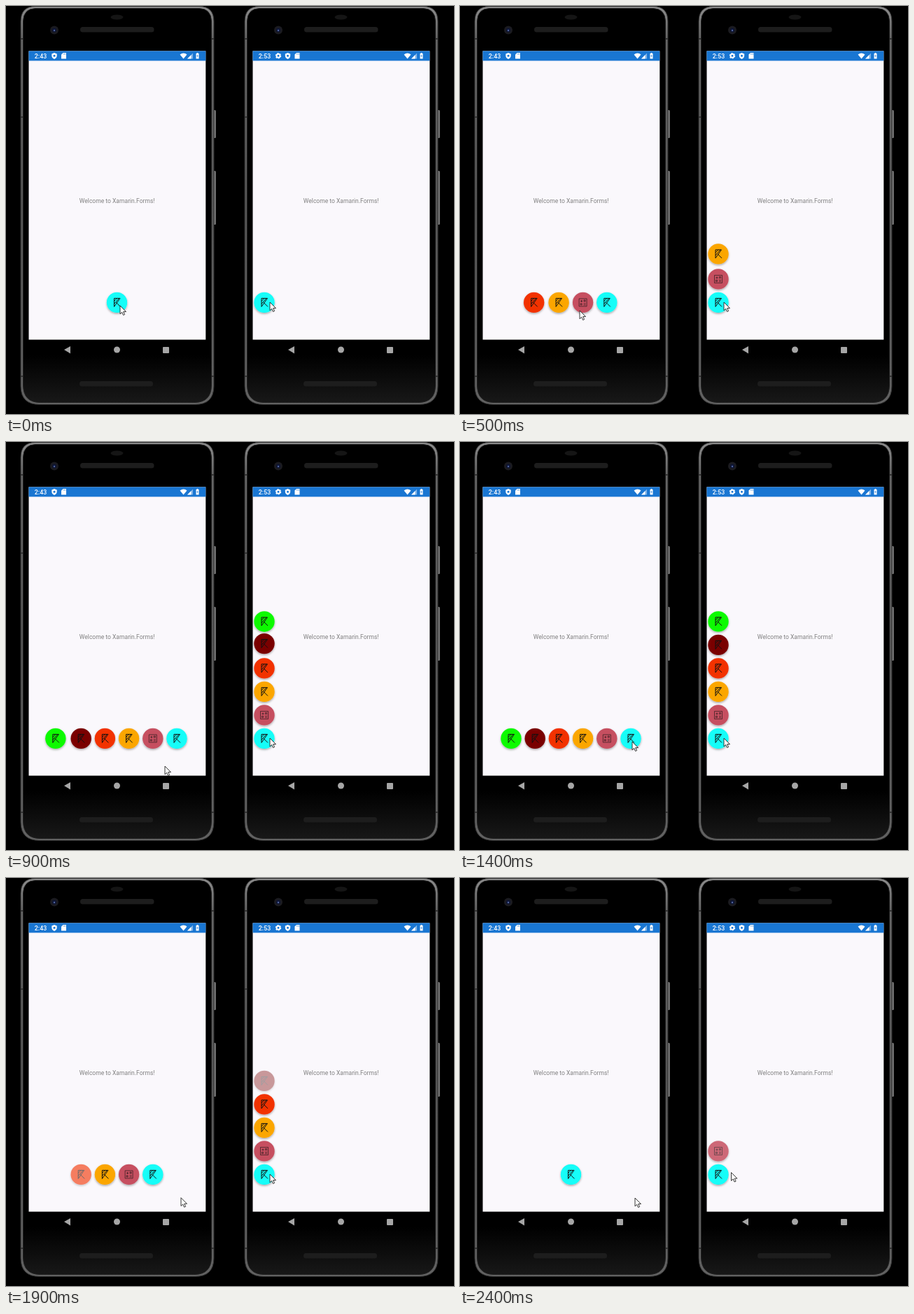
An HTML page that plays this animation: 640x584 px, repeating every 2500 ms.

```html
<!DOCTYPE html>
<html lang="en">
<head>
<meta charset="utf-8">
<title>Floating menus</title>
<style>
html, body { margin: 0; width: 100%; height: 100%; overflow: hidden; background: #000; }
svg { display: block; width: 640px; height: 584px; }
text { font-family: Roboto, Arial, sans-serif; }
</style>
</head>
<body>
<svg id="stage" viewBox="0 0 640 584">
  <defs>
    <linearGradient id="rim" x2="0" y2="1">
      <stop offset="0" stop-color="#8c8c8c"/>
      <stop offset=".08" stop-color="#666"/>
      <stop offset=".5" stop-color="#565656"/>
      <stop offset="1" stop-color="#626262"/>
    </linearGradient>
    <linearGradient id="face" x2="0" y2="1">
      <stop offset=".88" stop-color="#000"/>
      <stop offset="1" stop-color="#181818"/>
    </linearGradient>
    <linearGradient id="key">
      <stop offset="0" stop-color="#333"/>
      <stop offset=".6" stop-color="#888"/>
      <stop offset="1" stop-color="#555"/>
    </linearGradient>
    <filter id="shadow" x="-30%" y="-30%" width="160%" height="170%">
      <feDropShadow dx="0" dy="1.5" stdDeviation="1.4" flood-opacity=".35"/>
    </filter>

    <g id="phone">
      <g fill="url(#key)">
        <rect x="295" y="149" width="5" height="40" rx="1.5"/>
        <rect x="295" y="236" width="5" height="77" rx="1.5"/>
      </g>
      <path d="M21 22Q21 .5 42 .5H276Q297 .5 297 22V544Q297 570.500 270 570.500H48Q21 570.500 21 544Z" fill="url(#rim)" stroke="#2c2c2c"/>
      <path d="M24.500 22Q25 4 42 3.500H276Q293 4 293.500 22V543Q293 567 270 567.500H48Q25 567 24.500 543Z" fill="url(#face)" stroke="#202020"/>
      <path d="M21 47h3M21 159h3M294 47h3M294 530h3M21 530h3" stroke="#333" stroke-width="2"/>
      <g fill="#1d1d1d">
        <rect x="106" y="30" width="105.500" height="7.500" rx="3.500"/>
        <rect x="105" y="537" width="105" height="7.500" rx="3.500"/>
        <ellipse cx="158.500" cy="16" rx="9" ry="3.500" fill="#151515"/>
      </g>
      <circle cx="69" cy="34.500" r="6" fill="#1b1b20"/>
      <circle cx="69" cy="34.500" r="3" fill="#0d1535"/>
      <circle cx="69" cy="35" r="1.200" fill="#53679e"/>
      <rect x="32.500" y="64.400" width="252.800" height="413.200" fill="#faf8fc"/>
      <rect x="32.500" y="64.400" width="252.800" height="14" fill="#1976d2"/>
      <text x="158.700" y="281.500" font-size="8.54" fill="#808080" text-anchor="middle">Welcome to Xamarin.Forms!</text>
      <g fill="#fff">
        <path d="M248.500 69.500Q253.500 65.500 258.500 69.500L253.500 75.500Z"/>
        <path d="M259 75.500L267 67.500V75.500Z" opacity=".45"/>
        <path d="M259 75.500L264.500 70V75.500Z"/>
        <path d="M271.500 68h1v-1h2v1h1v7.500h-4Z"/>
        <path d="M273.800 69l-1.300 3h1l-.3 2 1.300-3h-1Z" fill="#1976d2"/>
      </g>
      <g fill="#a6a6a6">
        <path d="M83 492L92 487V497.500Z"/>
        <circle cx="158.500" cy="492" r="4.500"/>
        <rect x="224" y="488" width="9" height="9" rx="1"/>
      </g>
    </g>

    <g id="badges">
      <path d="M69 67l3.700 1.500v2.500q0 3.300-3.700 5-3.700-1.700-3.700-5v-2.500Z" fill="#fff"/>
      <circle cx="69" cy="71.300" r="1.500" fill="#1976d2"/>
      <path d="M81.500 67h4.500v8.500h-7v-6Z" fill="#fff"/>
      <path d="M82 68v1.500M83.500 68v1.500M85 68v1.500" stroke="#1976d2" stroke-width=".6"/>
    </g>

    <path id="kite" d="M-4-6H4.500L-4 6ZM-4-2L0-6M-4 2L3-6M-1 0L5 6" fill="none" stroke="#111"/>
    <path id="grid" d="M-5.500-5.500h11v11h-11ZM-3.500-2h3M-2-3.500v3M1.500-3.500h2v2h-2ZM-3.500 1.500h2v2h-2ZM1 1.500h3M1 3.500h3" fill="none" stroke="#111" stroke-width=".8" opacity=".75"/>
    <path id="arrow" d="M0 0V11.800L2.700 9.300 4.600 13.500 6.600 12.600 4.700 8.600H8.500Z" fill="#fff" stroke="#222" stroke-width=".9"/>
  </defs>

  <rect width="640" height="584"/>
  <use href="#phone"/>
  <use href="#phone" x="320"/>
  <use href="#badges"/>
  <use href="#badges" x="333.500"/>
  <circle cx="389" cy="71.300" r="2.500" fill="none" stroke="#fff" stroke-width="2"/>
  <circle cx="389" cy="71.300" r="3.700" fill="none" stroke="#fff" stroke-width="1.100" stroke-dasharray="1.900 1.970"/>
  <g font-size="8.8" font-weight="500" fill="#fff">
    <text x="40.800" y="74.800">2:43</text>
    <text x="360.800" y="74.800">2:53</text>
  </g>
</svg>
<script>
const LOOP = 2500, STEP = 100, SPRING = 250, FADE = 130;
const CYAN = '#12fdf8', TEAL = '#589e94';
const COLORS = [CYAN, '#c64f61', '#fba604', '#f23005', '#7a0000', '#11fa05'];
const stage = document.getElementById('stage');

// Times for each menu item, counted outward from the main button.
const menus = [
  {
    open: [130, 270, 395, 560, 712],
    close: [2210, 2035, 1850, 1685, 1510],
    press: [[100, 300], [1500, 1900]],
    place: (slot, count) => [158.5 + ((count - 1) / 2 - slot) * 34.2, 424.4],
    mouse: [[0, 163, 429], [300, 163, 429], [500, 171, 436], [900, 227, 464],
      [1300, 246, 429], [1500, 246, 429], [1700, 250, 457], [2000, 250, 458]]
  },
  {
    open: [200, 320, 510, 705, 808],
    close: [2380, 2140, 1960, 1820, 1670],
    press: [[200, 400], [1600, 1900]],
    place: slot => [369, 424.4 - slot * 33.5],
    mouse: [[0, 377, 424], [1900, 377, 424], [2100, 379, 424], [2400, 387.5, 421.5]]
  }
];

function add(parent, tag, attrs) {
  const node = document.createElementNS('http://www.w3.org/2000/svg', tag);
  for (const key in attrs) node.setAttribute(key, attrs[key]);
  return parent.appendChild(node);
}

const moveTo = (node, [x, y]) => node.setAttribute('transform', `translate(${x} ${y})`);

const springOut = p => p >= 1 ? 1 : 1 + (p - 1) ** 2 * (2.70158 * (p - 1) + 1.70158);

function along(path, t) {
  const next = path.findIndex(point => point[0] > t);
  if (next < 0) return path.at(-1).slice(1);
  const [t0, x0, y0] = path[next - 1], [t1, x1, y1] = path[next];
  const k = (t - t0) / (t1 - t0);
  return [x0 + (x1 - x0) * k, y0 + (y1 - y0) * k];
}

for (const menu of menus) {
  menu.buttons = [];
  for (let i = COLORS.length - 1; i >= 0; i--) {
    const button = menu.buttons[i] = add(stage, 'g', {});
    add(button, 'circle', { r: 14.7, fill: COLORS[i], filter: 'url(#shadow)' });
    add(button, 'use', { href: i === 1 ? '#grid' : '#kite' });
  }
  menu.cursor = add(stage, 'use', { href: '#arrow' });
}

function drawMenu({ open, close, press, place, mouse, buttons, cursor }, t) {
  const shown = i => !i || t >= open[i - 1] && t < close[i - 1] + FADE;
  const count = buttons.filter((_, i) => shown(i)).length;
  buttons.forEach((button, i) => {
    button.style.display = shown(i) ? '' : 'none';
    const slot = i ? i - 1 + springOut((t - open[i - 1]) / SPRING) : 0;
    moveTo(button, place(slot, count));
    button.style.opacity = i ? Math.min(1, 1 - (t - close[i - 1]) / FADE) : 1;
  });
  const pressed = press.some(([from, to]) => t >= from && t < to);
  buttons[0].firstChild.setAttribute('fill', pressed ? TEAL : CYAN);
  moveTo(cursor, along(mouse, t));
}

function frame() {
  const t = Math.floor(performance.now() % LOOP / STEP) * STEP;
  menus.forEach(menu => drawMenu(menu, t));
  requestAnimationFrame(frame);
}
frame();
</script>
</body>
</html>
```
